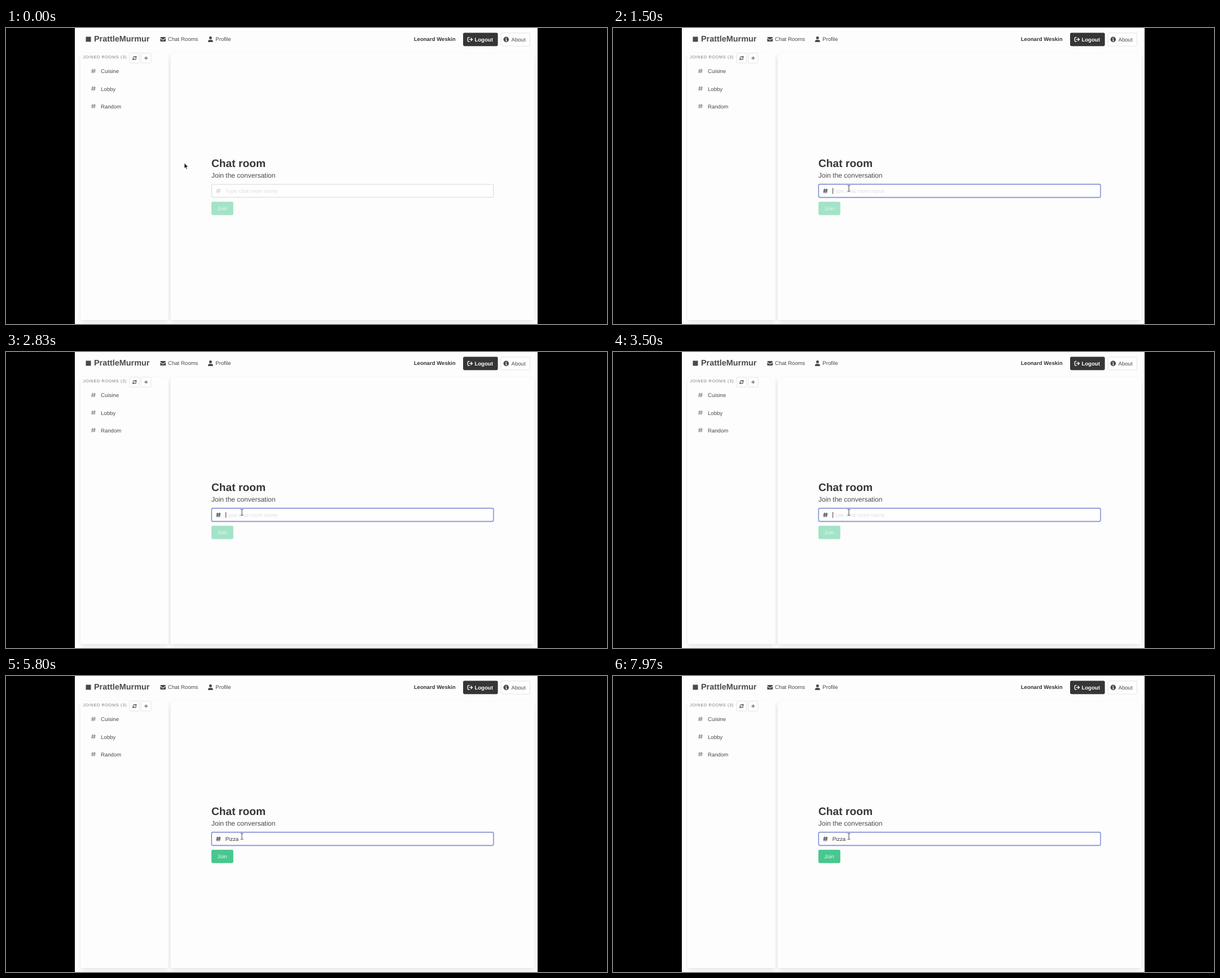
An HTML page for the animation above (8000 ms loop, 1065x526 px).

```html
<!DOCTYPE html>
<html lang="en">
<head>
<meta charset="utf-8">
<title>Chat room</title>
<style>
  html, body { margin: 0; width: 100%; height: 100%; overflow: hidden; background: #000; }
  #page { position: absolute; left: 122px; top: 0; width: 820px; height: 526px; background: #fdfdfd; overflow: hidden; }
  .panel {
    position: absolute; top: 44px; height: 475px; border-radius: 3.6px; background: #fdfdfd;
    box-shadow: 0 4.8px 9.6px -1.2px rgba(10,10,10,.1), 0 0 0 .6px rgba(10,10,10,.02);
  }
  svg { position: absolute; left: 0; top: 0; }
  text {
    font: 9.6px "Liberation Sans", Arial, sans-serif; fill: #4a4a4a;
    text-rendering: geometricPrecision; white-space: pre;
  }
  .bold { font-weight: 700; }
  .outline { fill: #fefefe; stroke: #dedede; stroke-width: .8; }
  .icon { fill: #4a4a4a; }
  .line { fill: none; stroke: #4a4a4a; stroke-width: 1.3; stroke-linecap: round; stroke-linejoin: round; }
</style>
</head>
<body>
<div id="page">
  <div class="panel" style="left:10px;width:156px"></div>
  <div class="panel" style="left:170px;width:644px"></div>
</div>
<svg width="1065" height="526" viewBox="0 0 1065 526">
  <defs>
    <path id="hash" d="M-1-3.6-2.2 3.6M2.2-3.6 1 3.6M-3.3-1.4H3.8M-3.8 1.4H3.3" fill="none" stroke-linecap="round"/>
  </defs>

  <!-- Navigation bar -->
  <rect class="icon" x="141.5" y="15.5" width="9" height="9"/>
  <text class="bold" x="156" y="24" style="font-size:14.4px">PrattleMurmur</text>
  <g class="icon">
    <path d="M273.3 17.2q0-1.3 1.2-1.3h7.4q1.2 0 1.2 1.3l-4.2 3.2q-.7.5-1.4 0zM273.3 18.6l3.8 2.8q1.1.8 2.2 0l3.8-2.8v4.3q0 1.2-1.2 1.2h-7.4q-1.2 0-1.2-1.2z"/>
    <circle cx="362.4" cy="17.5" r="2.5"/>
    <path d="M358 25v-.8q0-3.2 3.2-3.2h2.4q3.2 0 3.2 3.2v.8z"/>
  </g>
  <text x="287" y="23">Chat Rooms</text>
  <text x="371.3" y="23">Profile</text>
  <text class="bold" x="722.7" y="23" style="fill:#363636">Leonard Weskin</text>

  <rect x="810" y="8.5" width="61.6" height="23.7" rx="2.4" fill="#363636"/>
  <path class="line" style="stroke:#fff" d="M821 16.7h-1.2q-1.6 0-1.6 1.5v4.3q0 1.5 1.6 1.5h1.2M821.3 20.4h5M824.1 18l2.4 2.4-2.4 2.4"/>
  <text class="bold" x="830.4" y="23.8" style="fill:#fff">Logout</text>
  <rect class="outline" x="877" y="8.8" width="51.6" height="23.2" rx="2.4"/>
  <circle class="icon" cx="886.3" cy="20.4" r="4.8"/>
  <path d="M885 19.6h1.5v3M884.8 22.9h3.2" fill="none" stroke="#fff"/>
  <circle cx="886.3" cy="17.7" r=".75" fill="#fff"/>
  <text x="895.5" y="23.6">About</text>

  <!-- Room list -->
  <text x="136.2" y="53.9" style="font-size:7.2px;letter-spacing:.72px;fill:#7a7a7a">JOINED ROOMS (3)</text>
  <rect class="outline" x="219" y="45" width="17.6" height="17.2" rx="1.6"/>
  <path class="line" style="stroke-width:1.1" d="M224.9 52.8q.7-2.2 2.9-2.2 1.7 0 2.8 1.5M230.9 50v2.3h-2.3M230.8 54q-.7 2.2-2.9 2.2-1.7 0-2.8-1.5M224.8 56.8v-2.3h2.3"/>
  <rect class="outline" x="239.5" y="45" width="17.4" height="17.2" rx="1.6"/>
  <path class="line" style="stroke-width:1.1" d="M245.6 53.5h5.2M248.2 50.9v5.2"/>
  <g id="rooms"></g>

  <!-- Join form -->
  <text class="bold" x="364" y="247" style="font-size:19.2px;fill:#363636">Chat room</text>
  <text x="364" y="265.5" style="font-size:12px">Join the conversation</text>
  <rect id="glow" x="363.8" y="277.2" width="500.6" height="24.4" rx="2.8" fill="none" stroke="#485fc7" stroke-opacity=".25" stroke-width="1.8"/>
  <rect id="field" x="364.5" y="277.9" width="499.2" height="23" rx="2.2" fill="#fefefe"/>
  <use id="fieldHash" href="#hash" x="376.4" y="289.4" stroke-width="1.3"/>
  <text id="value" x="388.7" y="292.8"></text>
  <rect id="caret" y="284.3" width=".9" height="10.6" fill="#363636"/>
  <rect id="join" x="364" y="308.8" width="38.8" height="23.7" rx="2.4"/>
  <text x="374.3" y="324.3" style="fill:#fff" id="joinText">Join</text>

  <!-- Pointer shapes -->
  <path id="arrow" d="M0 0v9.6l2.2-2 1.5 3.5 1.6-.7-1.5-3.4h3z" fill="#151520" stroke="#fff" stroke-width=".7"/>
  <path id="beam" d="M-2.4-5.2h1.7l.7.6.7-.6h1.7M-2.4 5.2h1.7l.7-.6.7.6h1.7M0-4.6v9.2" fill="none" stroke="#3c3c50" stroke-width="1"/>
</svg>
<script>
  const LOOP = 8000, FOCUS = 450, BLINK = 500, MOVE_END = 400;
  const WORD = "Pizza";
  const KEY_TIMES = [4380, 4500, 4700, 4850, 5050];
  const TEXT_X = 388.7;
  const el = id => document.getElementById(id);
  const set = (id, attrs) => Object.entries(attrs).forEach(([k, v]) => el(id).setAttribute(k, v));
  const show = (id, on) => { el(id).style.display = on ? "" : "none"; };

  el("rooms").innerHTML = ["Cuisine", "Lobby", "Random"].map((name, i) => {
    const y = 76.4 + i * 31.2;
    return `<use href="#hash" x="154.9" y="${y}" stroke="#7a7a7a" stroke-width="1"/>
      <text x="168" y="${y + 4}">${name}</text>`;
  }).join("");

  function drawPointer(t) {
    const p = Math.min(t / MOVE_END, 1);
    const ease = p * p * (3 - 2 * p);
    const x = 316 + 102 * ease, y = 240 + 45 * ease;
    const overField = x > 364 && y > 278;
    show("arrow", !overField);
    show("beam", overField);
    set(overField ? "beam" : "arrow", { transform: `translate(${x} ${y})` });
  }

  function draw(t) {
    const focused = t >= FOCUS;
    const count = KEY_TIMES.filter(k => t >= k).length;
    const value = el("value");
    value.textContent = count ? WORD.slice(0, count) : "Type chat room name";
    value.style.fill = count ? "#363636" : "#dfdfe2";

    show("glow", focused);
    set("field", { stroke: focused ? "#7582d0" : "#cdd0e2", "stroke-width": focused ? 1.1 : 0.9 });
    set("fieldHash", { stroke: focused ? "#4a4a4a" : "#d8d8dc" });
    set("join", { fill: count ? "#48c78e" : "#a3e3c7" });
    el("joinText").style.opacity = count ? 0.85 : 0.7;

    // Each key press restarts the caret blink.
    const since = t - (count ? KEY_TIMES[count - 1] : FOCUS);
    show("caret", focused && since % (2 * BLINK) < BLINK);
    set("caret", { x: TEXT_X + (count ? value.getComputedTextLength() : 0.3) });
    drawPointer(t);
  }

  const start = performance.now();
  function tick() {
    draw((performance.now() - start) % LOOP);
    requestAnimationFrame(tick);
  }
  tick();
</script>
</body>
</html>
```
